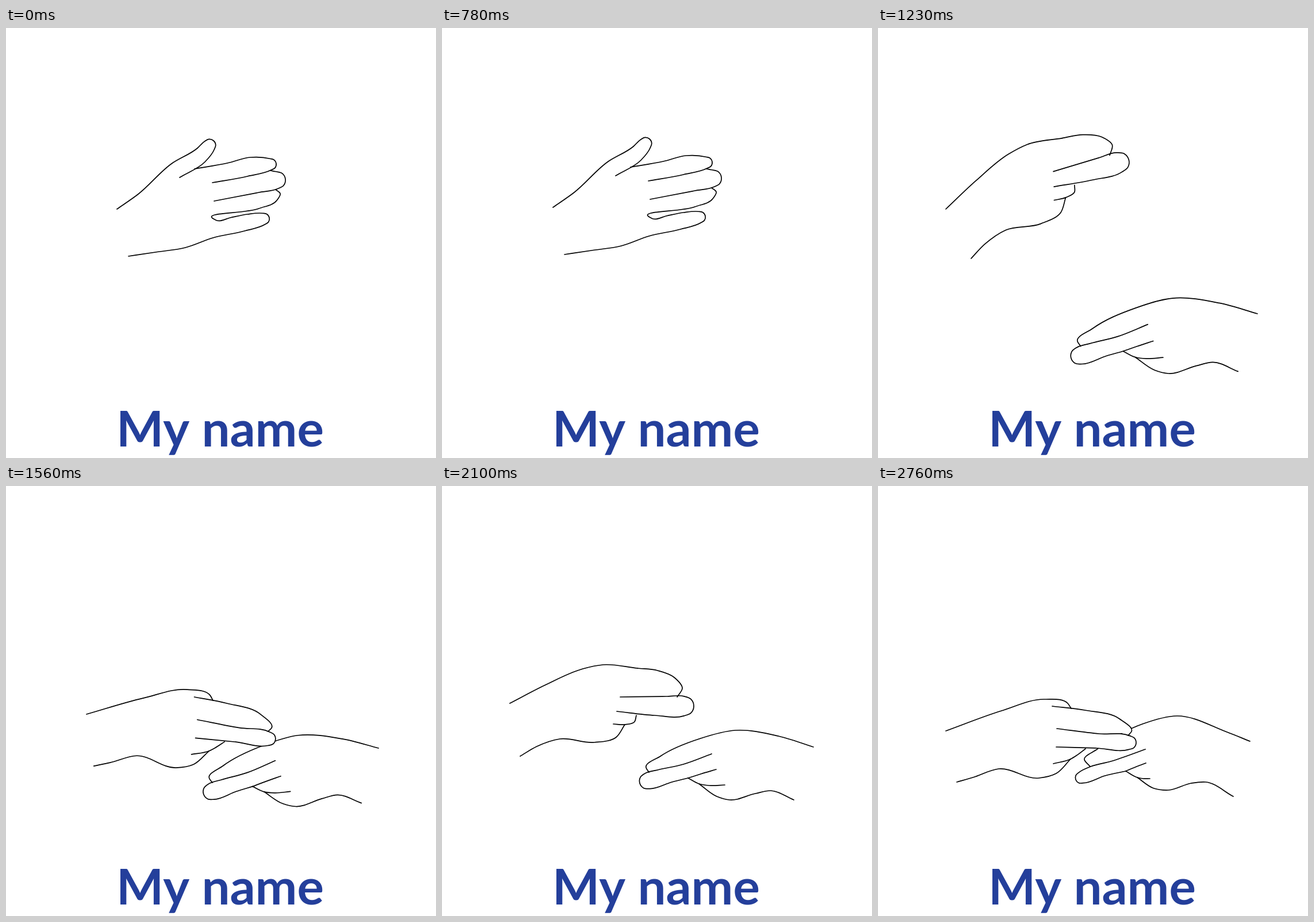
These frames come from a looping animation (748x748 px, 2790 ms). An HTML page with a canvas:

```html
<!DOCTYPE html>
<html lang="en">
<head>
<meta charset="utf-8">
<title>My name</title>
<style>
html, body { margin: 0; width: 100%; height: 100%; overflow: hidden; background: #fff; }
canvas { display: block; }
</style>
</head>
<body>
<canvas id="stage" width="748" height="748"></canvas>
<script>
const LOOP = 2790, CUT = 870, FRAME = 30;
const ctx = document.getElementById('stage').getContext('2d');

const mix = (a, b, k) => a + (b - a) * k;
const mixAll = (a, b, k) => a.map((v, i) => mix(v, b[i], k));
const curve = path => path.split(' ').map(pair => pair.split(',').map(Number));

// Outline that runs up one side, round a tip of the given half width, and back
function finger(up, tip, width, down) {
  const rise = curve(up), fall = curve(down), [[tx, ty]] = curve(tip);
  const [ax, ay] = rise.at(-1), [bx, by] = fall[0];
  let dx = tx - (ax + bx) / 2, dy = ty - (ay + by) / 2;
  const len = Math.hypot(dx, dy);
  dx *= width / len;
  dy *= width / len;
  const side = Math.sign(dx * (ay - ty) - dy * (ax - tx));
  const cap = [-2, -1, 0, 1, 2].map(i => {
    const angle = i * Math.PI / 4, back = 1 - Math.cos(angle), out = -side * Math.sin(angle);
    return [tx - dx * back - dy * out, ty - dy * back + dx * out];
  });
  return [...rise, ...cap, ...fall];
}

const flatHand = [
  finger('193,312 230,286 288,233 333,206', '361,193', 11, '346,230 302,257'),
  finger('328,242 385,232 425,222', '470,233', 10, '420,255 359,266'),
  finger('460,245', '486,260', 15, '440,283 362,298'),
  finger('469,278 477,285 471,297 440,311 361,329 367,332 390,327 420,321', '458,327', 10,
    '415,350 360,362 312,379 260,387 213,394')
];

// Back, index, middle, ring, lower edge
const leftHand = {
  open: [
    curve('118,378 180,346 245,318 280,311 340,317'),
    curve('340,317 375,321 404,333 418,352 409,367'),
    finger('310,367 390,366', '438,383', 17, '370,399 304,392'),
    curve('338,399 335,410 318,415 298,414'),
    curve('318,415 303,437 265,446 205,440 165,453 136,470')
  ],
  closed: [
    curve('118,429 215,394 290,374 330,381 336,390'),
    curve('303,386 360,393 420,408 441,430 435,437'),
    finger('311,425 385,434', '449,450', 12, '380,459 310,457'),
    curve('361,460 345,472 335,478 305,486'),
    curve('335,478 310,503 280,511 210,495 165,510 137,518')
  ]
};

// Back with index, middle, fold, crease, lower edge
const rightHand = {
  open: [
    curve('646,454 585,435 510,425 450,439 380,470 355,490 360,498'),
    finger('469,466 420,484 375,494', '344,517', 14, '400,515 428,508'),
    curve('477,493 450,501 428,508'),
    curve('428,508 447,518 465,521 492,520'),
    curve('447,518 478,540 500,546 545,535 572,530 612,546')
  ],
  closed: [
    curve('652,446 612,430 525,402 465,416 386,460 364,478 374,490'),
    finger('470,460 410,481 375,490', '349,513', 10, '400,506 436,498'),
    curve('471,484 455,490 436,498'),
    curve('436,498 456,509 466,511 478,511'),
    curve('456,509 485,528 510,531 550,519 575,517 623,542')
  ]
};

// Time, then for each hand: wrist x, wrist y, degrees, scale, how far closed
const keys = [
  [870, [122, 315, -16, 1.03, 0], [664, 500, -1.7, 1.08, 0]],
  [1170, [119, 300, -16, 1.03, 0], [671, 527, -1.7, 1.08, 0]],
  [1230, [118, 315, -16, 1.03, 0], [660, 497, -1.7, 1.08, 0]],
  [1560, [140, 397, 4, 1, 1], [648, 456, -3, 1.02, 0]],
  [1680, [119, 428, 0, 1, 1], [652, 451, 0, 1, 1]],
  [1950, [100, 335, 0, 1, 0], [663, 473, 0, 1, 0]],
  [2100, [118, 378, 0, 1, 0], [646, 454, 0, 1, 0]],
  [2280, [118, 427, 0, 1, 1], [660, 455, 0, 1, 1]],
  [2520, [118, 429, 0, 1, 1], [652, 446, 0, 1, 1]],
  [2760, [118, 426, 0, 1, 1], [647, 444, 0, 1, 1]]
];

function placeHand({ open, closed }, [x, y, degrees, scale, amount]) {
  const angle = degrees * Math.PI / 180;
  const cos = Math.cos(angle) * scale, sin = Math.sin(angle) * scale;
  const [wx, wy] = mixAll(open[0][0], closed[0][0], amount);
  return open.map((line, l) => line.map((point, p) => {
    const [px, py] = mixAll(point, closed[l][p], amount);
    const dx = px - wx, dy = py - wy;
    return [x + dx * cos - dy * sin, y + dx * sin + dy * cos];
  }));
}

// Smooth curve through the points, with tangents weighted by segment length
function trace(points) {
  const last = points.length - 1;
  const step = points.slice(1).map(([x, y], i) => [x - points[i][0], y - points[i][1]]);
  const len = step.map(([x, y]) => Math.hypot(x, y) || 0.01);
  const tangent = (i, axis) => {
    if (i === 0) return step[0][axis] / len[0];
    if (i === last) return step[last - 1][axis] / len[last - 1];
    const a = len[i - 1], b = len[i];
    return (step[i - 1][axis] * b / a + step[i][axis] * a / b) / (a + b);
  };
  ctx.beginPath();
  ctx.moveTo(...points[0]);
  for (let i = 0; i < last; i++) {
    const h = len[i] / 3, [x0, y0] = points[i], [x1, y1] = points[i + 1];
    ctx.bezierCurveTo(
      x0 + tangent(i, 0) * h, y0 + tangent(i, 1) * h,
      x1 - tangent(i + 1, 0) * h, y1 - tangent(i + 1, 1) * h, x1, y1);
  }
}

function drawLines(lines) {
  for (const line of lines) {
    trace(line);
    ctx.stroke();
  }
}

function drawFlatHand(t) {
  const settle = Math.min(1, t / 570), lift = Math.sin(settle * Math.PI);
  const dx = -5 * lift, dy = 3 * (1 - settle) - 9 * lift;
  drawLines(flatHand.map(line => line.map(([x, y]) => [x + dx, y + dy])));
}

function drawBothHands(t) {
  let i = 0;
  while (i < keys.length - 2 && t >= keys[i + 1][0]) i++;
  const [t0, left0, right0] = keys[i], [t1, left1, right1] = keys[i + 1];
  const k = (t - t0) / (t1 - t0);
  const left = placeHand(leftHand, mixAll(left0, left1, k));
  drawLines(placeHand(rightHand, mixAll(right0, right1, k)));
  // The left fingers hide what lies behind them
  for (const line of left.slice(1, 3)) {
    trace(line);
    ctx.fill();
  }
  drawLines(left);
}

function draw(t) {
  ctx.fillStyle = '#fff';
  ctx.fillRect(0, 0, 748, 748);
  ctx.strokeStyle = '#000';
  ctx.lineWidth = 1.7;
  ctx.lineCap = ctx.lineJoin = 'round';
  const hold = t < CUT ? FRAME * 2 : FRAME;
  const heldTime = Math.floor(t / hold) * hold;
  if (t < CUT) drawFlatHand(heldTime);
  else drawBothHands(heldTime);
  ctx.fillStyle = '#243f9b';
  ctx.font = 'bold 87px Lato, sans-serif';
  ctx.textAlign = 'center';
  ctx.fillText('My name', 372.5, 728);
}

const start = performance.now();
function tick() {
  draw((performance.now() - start) % LOOP);
  requestAnimationFrame(tick);
}
tick();
</script>
</body>
</html>
```
